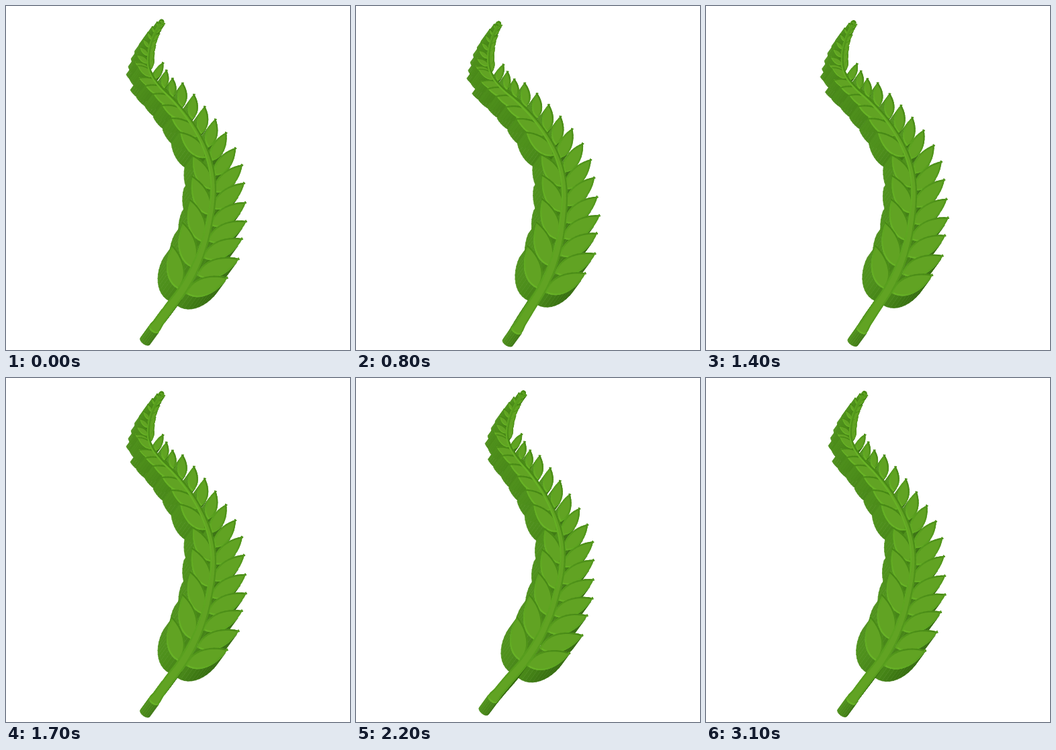
An HTML page with a canvas that plays this animation: 512 by 512 pixels, repeating every 3.2 s.

```html
<!DOCTYPE html>
<html lang="en">
<head>
<meta charset="utf-8">
<title>Swaying leaf</title>
<style>
html, body { margin: 0; width: 100%; height: 100%; overflow: hidden; background: #fff; }
canvas { display: block; width: 100vmin; height: 100vmin; }
</style>
</head>
<body>
<canvas id="stage" width="512" height="512"></canvas>
<script>
const ctx = document.getElementById('stage').getContext('2d');
const LOOP = 3200, STEP = 100, REST = 200, SWING = 5 * Math.PI / 180;
const DEPTH = [-13, 18];
const FACE = 'rgb(97,163,35)';

// stem centre line: x, y, half width
const SPINE = [
  [220, 481, 7.5], [243, 449, 7.5], [263, 422, 7], [281, 390, 6.5], [295, 354, 5.5],
  [303, 320, 5], [308, 288, 4.5], [308, 258, 4.2], [302, 228, 4], [290, 198, 3.5],
  [272, 168, 3], [250, 141, 2.6], [230, 121, 2.4], [217, 103, 2.2], [212, 85, 2],
  [214, 62, 2], [222, 40, 2], [231, 25, 2.6]
];
// leaves: base x, y, tip x, y
const LEFT = [
  [256, 421, 248, 356], [276, 389, 264, 322], [291, 351, 275, 288], [301, 311, 278, 253],
  [304, 273, 279, 222], [297, 226, 259, 187], [287, 194, 246, 166], [272, 168, 232, 147],
  [258, 149, 219, 130], [244, 132, 207, 118], [230, 120, 198, 107], [219, 105, 196, 88]
];
const RIGHT = [
  [268, 428, 330, 404], [285, 401, 347, 376], [294, 375, 352, 346], [301, 350, 358, 320],
  [306, 327, 357, 292], [309, 302, 355, 263], [311, 277, 352, 236], [311, 252, 342, 211],
  [306, 230, 328, 188], [301, 210, 312, 168], [290, 190, 296, 149], [277, 168, 280, 131],
  [262, 150, 263, 114], [248, 135, 248, 107], [235, 122, 239, 95], [222, 108, 234, 84]
];

const mix = (a, b, k) => a + (b - a) * k;
const rgb = (a, b, k) => 'rgb(' + a.map((v, i) => Math.round(mix(v, b[i], k))).join() + ')';

function spineAt(s) {
  const last = SPINE.length - 1;
  const i = Math.min(Math.floor(s), last - 1), t = s - i;
  const [a, b, c, d] = [-1, 0, 1, 2].map(k => SPINE[Math.max(0, Math.min(last, i + k))]);
  return b.map((v, j) => v + t / 2 * (c[j] - a[j] +
    t * (2 * a[j] - 5 * v + 4 * c[j] - d[j] + t * (3 * (v - c[j]) + d[j] - a[j]))));
}

function heading(s) {
  const a = spineAt(Math.max(0, s - 0.05));
  const b = spineAt(Math.min(SPINE.length - 1, s + 0.05));
  return Math.atan2(b[1] - a[1], b[0] - a[0]);
}

function cubic(a, b, c, d, t) {
  const m = 1 - t;
  return [0, 1].map(i =>
    m * m * m * a[i] + 3 * m * m * t * b[i] + 3 * m * t * t * c[i] + t * t * t * d[i]);
}

function leaf([bx, by, tx, ty]) {
  const dx = tx - bx, dy = ty - by;
  const at = (u, v) => [bx + dx * u - dy * v, by + dy * u + dx * v];
  const side = k => t => cubic(at(0, 0), at(0.2, 0.29 * k), at(0.66, 0.25 * k), at(1, 0), t);
  const up = side(1), down = side(-1), pts = [];
  for (let i = 0; i < 12; i++) pts.push(up(i / 12));
  for (let i = 12; i > 0; i--) pts.push(down(i / 12));
  return pts;
}

function stem() {
  const a = [], b = [], end = SPINE.length - 1;
  for (let s = 0; s <= end; s += 0.2) {
    const [x, y, w] = spineAt(s), h = heading(s);
    const r = w + (s < 0.3 ? 1 : 0);
    a.push([x + Math.sin(h) * r, y - Math.cos(h) * r]);
    b.unshift([x - Math.sin(h) * r, y + Math.cos(h) * r]);
  }
  const [x, y, w] = spineAt(0), h = heading(0);
  const cap = [];
  for (let i = 1; i < 8; i++) {
    const q = h + Math.PI / 2 + Math.PI * i / 8;
    const bulge = Math.cos(q - h) * w * 0.6;
    const across = Math.sin(q - h) * (w + 1);
    cap.push([x + Math.cos(h) * bulge - Math.sin(h) * across,
              y + Math.sin(h) * bulge + Math.cos(h) * across]);
  }
  return a.concat(b, cap);
}

function bud() {
  return Array.from({ length: 14 }, (_, i) => {
    const q = i / 7 * Math.PI;
    return [231.5 + 3.8 * Math.cos(q), 23.5 + 3.8 * Math.sin(q)];
  });
}

// small leaves that crowd the curled end
function sprigs(turn, from, len0, len1) {
  return Array.from({ length: 7 }, (_, i) => {
    const k = i / 6, s = mix(from, 16.5, k);
    const [x, y] = spineAt(s), q = heading(s) + turn, len = mix(len0, len1, k);
    return leaf([x, y, x + Math.cos(q) * len, y + Math.sin(q) * len]);
  });
}

function clockwise(pts) {
  const area = pts.reduce((sum, p, i) => {
    const q = pts[(i + 1) % pts.length];
    return sum + p[0] * q[1] - q[0] * p[1];
  }, 0);
  return area > 0 ? pts : pts.slice().reverse();
}

const shapes = [
  ...sprigs(-0.85, 13.5, 24, 8), ...sprigs(0.5, 13.5, 23, 11),
  ...LEFT.map(leaf).reverse(), ...RIGHT.map(leaf).reverse(), bud(), stem()
].map(clockwise);

function edgesOf(pts) {
  const out = [];
  pts.forEach((p, i) => {
    const q = pts[(i + 1) % pts.length];
    const dx = q[0] - p[0], dy = q[1] - p[1], len = Math.hypot(dx, dy);
    if (len > 0.01) out.push({ p, q, nx: dy / len, ny: -dx / len });
  });
  return out;
}

function trace(pts) {
  ctx.beginPath();
  pts.forEach(p => ctx.lineTo(p[0], p[1]));
  ctx.closePath();
}

function drawWalls(edges) {
  const [ox, oy] = DEPTH;
  const reach = e => (e.p[0] + e.q[0]) * ox + (e.p[1] + e.q[1]) * oy;
  ctx.lineWidth = 0.7;
  edges.filter(e => e.nx * ox + e.ny * oy > 0)
    .sort((a, b) => reach(a) - reach(b))
    .forEach(({ p, q, nx }) => {
      ctx.fillStyle = ctx.strokeStyle = rgb([80, 146, 29], [51, 105, 14], (nx + 1) / 1.8);
      trace([p, q, [q[0] + ox, q[1] + oy], [p[0] + ox, p[1] + oy]]);
      ctx.fill();
      ctx.stroke();
    });
}

function drawFace(pts, edges, small) {
  ctx.fillStyle = FACE;
  trace(pts);
  ctx.fill();
  const w = small ? 1.3 : 2.2, inset = w / 2;
  ctx.lineWidth = w;
  for (const { p, q, nx, ny } of edges) {
    const light = (1 - nx * 0.6 + ny * 0.8) / 2;
    ctx.strokeStyle = rgb([71, 136, 22], [104, 179, 38], light);
    ctx.beginPath();
    ctx.moveTo(p[0] - nx * inset, p[1] - ny * inset);
    ctx.lineTo(q[0] - nx * inset, q[1] - ny * inset);
    ctx.stroke();
  }
}

function draw(time) {
  const t = Math.max(0, time - REST) / (LOOP - REST);
  const angle = -SWING * Math.sin(t * 2 * Math.PI);
  const c = Math.cos(angle), s = Math.sin(angle);
  const posed = shapes.map(pts => pts.map(([x, y]) =>
    [256 + (x - 256) * c - (y - 256) * s, 256 + (x - 256) * s + (y - 256) * c]));
  const edges = posed.map(edgesOf);
  ctx.fillStyle = '#fff';
  ctx.fillRect(0, 0, 512, 512);
  ctx.lineCap = ctx.lineJoin = 'round';
  drawWalls(edges.flat());
  posed.forEach((pts, i) => drawFace(pts, edges[i], i < 16));
}

let shown = -1;
function tick() {
  const time = Math.floor(performance.now() % LOOP / STEP) * STEP;
  if (time !== shown) draw(shown = time);
  requestAnimationFrame(tick);
}
tick();
</script>
</body>
</html>
```
